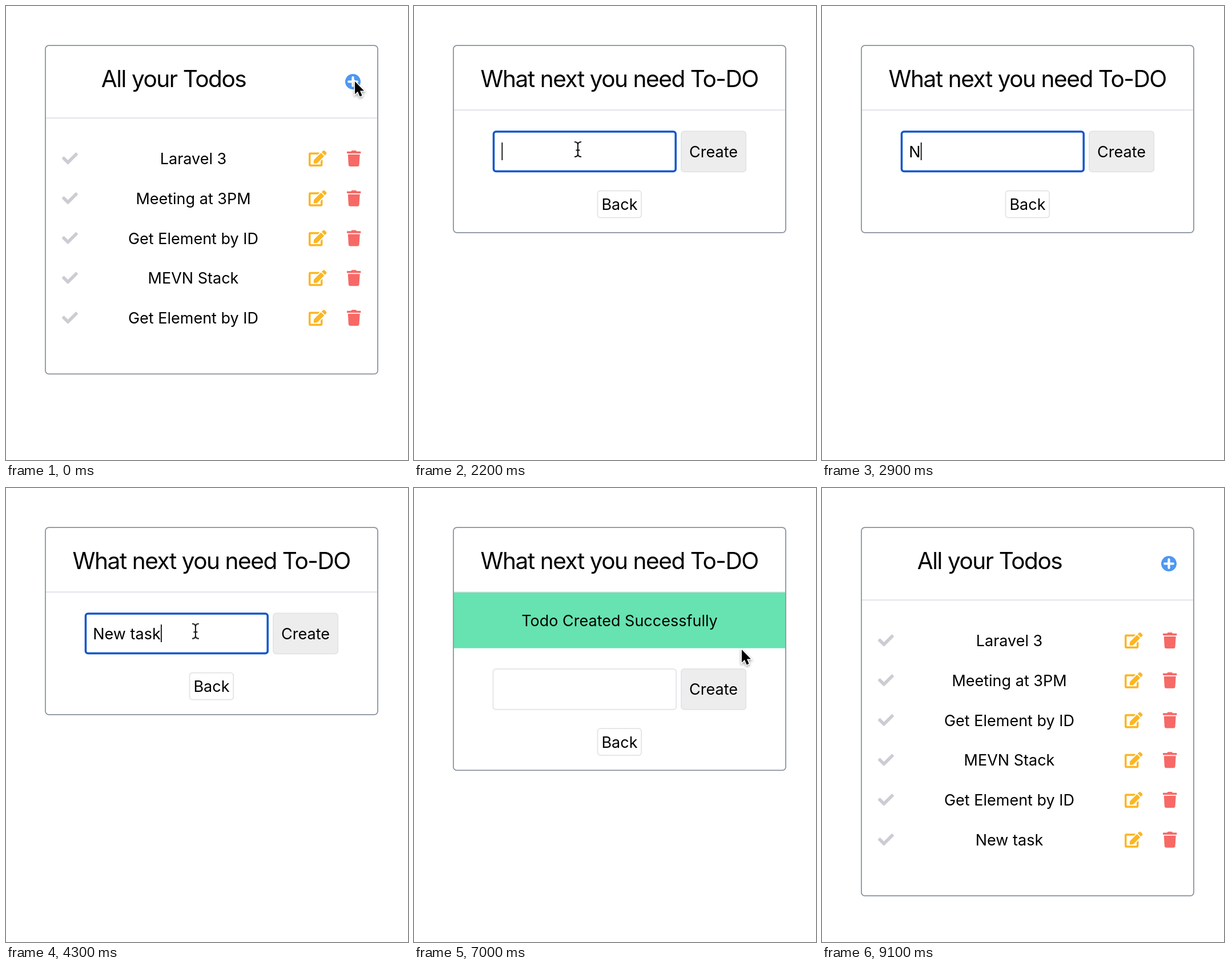
Animation, 704 px wide and 795 px high, one loop 9200 ms. Source, as an HTML page:

```html
<!DOCTYPE html>
<html lang="en">
<head>
<meta charset="utf-8">
<title>Todo list</title>
<style>
  html, body { margin: 0; width: 100%; height: 100%; overflow: hidden; background: #fff; }
  svg { display: block; width: 704px; height: 795px; }
  text { font: 27px Inter, "Open Sans", sans-serif; font-optical-sizing: none; }
  .mid { text-anchor: middle; }
  .title { font-size: 40.6px; letter-spacing: -.036em; }
  .line { fill: #dadee3; }
  .box { fill: #fff; stroke: #e1e3e6; stroke-width: 1.75px; }
  .focus { fill: none; stroke: #1056cc; stroke-width: 3.5px; }
  #card { fill: #fff; stroke: #87909e; stroke-width: 1.75px; }
  #menu rect { fill: #242529; filter: drop-shadow(0 2px 3px #0006); }
  #menu text { font-size: 22.9px; font-weight: 500; fill: #e9e9eb; }
  #arrow { stroke: #fff; stroke-width: 3px; paint-order: stroke; filter: drop-shadow(0 2px 2px #0006); }
  #beam { fill: none; stroke: #111; stroke-width: 2px; }
</style>
</head>
<body>
<svg viewBox="0 0 704 795">
  <defs>
    <path id="check" fill="#cccdd3" d="M174 439L7.5 273c-10-10-10-26 0-36l36-36c10-10 26-10 36 0L192 313 432 73c10-10 26-10 36 0l36 36c10 10 10 26 0 36L210 439c-10 10-26 10-36 0z"/>
    <path id="edit" fill="#fbb623" d="M403 83l90 90c4 4 4 10 0 14L274 406l-92 10c-13 1-23-9-22-22l10-92L389 83c4-4 10-4 14 0zM565 60l-49-49c-15-15-40-15-55 0l-36 36c-4 4-4 10 0 14l90 90c4 4 10 4 14 0l36-36c15-15 15-40 0-55zM384 346V448H64V128H294c3 0 6-1 8-3l40-40c8-8 3-21-8-21H48C21 64 0 85 0 112v352c0 27 21 48 48 48h352c27 0 48-21 48-48V306c0-11-13-16-21-8l-40 40c-2 2-3 5-3 8z"/>
    <path id="trash" fill="#f66966" d="M432 32H312l-9-19A24 24 0 0 0 281 0H167a24 24 0 0 0-22 13L136 32H16A16 16 0 0 0 0 48v32a16 16 0 0 0 16 16h416a16 16 0 0 0 16-16V48a16 16 0 0 0-16-16zM53 467a48 48 0 0 0 48 45h246a48 48 0 0 0 48-45L416 128H32z"/>
  </defs>

  <rect id="card" x="69" y="69" width="582" height="575.4" rx="6"/>

  <g id="list">
    <text class="mid title" x="293.5" y="142">All your Todos</text>
    <rect class="line" x="70" y="195.4" width="580" height="1.6"/>
    <circle cx="607.5" cy="132.5" r="13.5" fill="#4e98f2"/>
    <path d="M600.2 132.5h14.6M607.5 125.2v14.6" stroke="#fff" stroke-width="4.2" stroke-linecap="round"/>
    <g id="rows"></g>
  </g>

  <g id="form">
    <text class="mid title" x="359.7" y="142">What next you need To-DO</text>
    <rect class="line" x="70" y="181.4" width="580" height="1.6"/>
    <g id="notice">
      <rect x="70" y="183" width="580" height="97.5" fill="#66e3b0"/>
      <text class="mid" x="360" y="242">Todo Created Successfully</text>
    </g>
    <g id="controls">
      <rect class="box" x="138.5" y="219.3" width="320.7" height="71" rx="5"/>
      <rect class="box" x="468" y="219.3" width="113.2" height="71" rx="5" style="fill:#ededed"/>
      <text class="mid" x="524.5" y="264.5">Create</text>
      <rect class="box" x="321.5" y="323.5" width="76.7" height="47" rx="5"/>
      <text class="mid" x="360" y="357">Back</text>
      <rect id="fieldFocus" class="focus" x="139.5" y="220" width="318.7" height="69.5" rx="4"/>
      <rect id="buttonFocus" class="focus" x="469" y="220" width="111.2" height="69.5" rx="4"/>
      <text id="typed" x="152.2" y="264.5"></text>
      <rect id="caret" x="153.5" y="239" width="1.7" height="31"/>
    </g>
    <g id="menu"><rect x="136" y="293" width="397" height="404" rx="6"/></g>
  </g>

  <g id="cursor">
    <path id="arrow" d="M0 0V22.5L5 17.8L8.6 26.4L12.6 24.7L9 16.4H16Z"/>
    <path id="beam" d="M-6-13Q0-13 0-8V8Q0 13-6 13M6-13Q0-13 0-8M0 8Q0 13 6 13M-3.5 1.5H3.5"/>
  </g>
</svg>
<script>
const LOOP = 9200, ROW = 69.76;
const OPEN = 1700, FOCUS = 2200, MENU = 2300, CLICK = 5400, SAVED = 5700, RETURN = 8300;
const $ = id => document.getElementById(id);

function add(parent, tag, attrs, text = '') {
  const el = document.createElementNS('http://www.w3.org/2000/svg', tag);
  for (const key in attrs) el.setAttribute(key, attrs[key]);
  el.textContent = text;
  return parent.appendChild(el);
}

const play = (el, frames) => el.animate(frames, { duration: LOOP, iterations: Infinity });

// Each value holds from its time until the next one.
function hold(el, prop, stops) {
  stops = [...stops, [LOOP, stops.at(-1)[1]]];
  play(el, stops.map(([t, v]) => ({ offset: t / LOOP, [prop]: v, easing: 'step-end' })));
}

function show(el, ...spans) {
  const stops = spans.flatMap(([from, to]) => [[from, 1], [to, 0]]).filter(([t]) => t < LOOP);
  if (stops[0][0] > 0) stops.unshift([0, 0]);
  hold(el, 'opacity', stops);
}

// Travels between points in 100 ms steps.
function travel(el, points) {
  play(el, points.map(([t, x, y], i) => ({
    offset: t / LOOP,
    transform: `translate(${x}px, ${y}px)`,
    easing: i + 1 < points.length ? `steps(${Math.round((points[i + 1][0] - t) / 100)}, end)` : 'linear'
  })));
}

const todos = ['Laravel 3', 'Meeting at 3PM', 'Get Element by ID', 'MEVN Stack', 'Get Element by ID', 'New task'];
const rows = todos.map((todo, i) => {
  const row = add($('rows'), 'g', { transform: `translate(0 ${253 + i * ROW})` });
  add(row, 'text', { class: 'mid', x: 328, y: 24 }, todo);
  [['check', 98], ['edit', 530], ['trash', 597]].forEach(([icon, x]) =>
    add(row, 'use', { href: '#' + icon, transform: `translate(${x} 0) scale(.0545)` }));
  return row;
});

['Get Element by ID', 'Get Element by class', 'Shrieking Shack', 'MEVN Stack',
  'CRUD operations in express JS', 'MERN Stack'].forEach((item, i) =>
  add($('menu'), 'text', { x: 156, y: 347 + i * 62.75 }, item));

const keyTimes = [2800, 3000, 3100, 3300, 3500, 3600, 3800, 4000];
const typed = $('typed');
[...'New task'].forEach((letter, i) => {
  const span = add(typed, 'tspan', {}, letter);
  hold(span, 'fillOpacity', [[0, 0], [keyTimes[i], 1], [SAVED, 0]]);
});
const caretX = i => typed.getEndPositionOfChar(i).x + .3;
hold($('caret'), 'x', [[0, '153.5px'], ...keyTimes.map((t, i) => [t, caretX(i) + 'px'])]);
show($('caret'), [FOCUS, CLICK]);

hold($('card'), 'height', [[0, '575.4px'], [OPEN, '327.8px'], [SAVED, '425.4px'], [RETURN, '645.1px']]);
hold($('controls'), 'transform', [[0, 'translateY(0px)'], [SAVED, 'translateY(97.6px)']]);
show($('list'), [0, OPEN], [RETURN, LOOP]);
show($('form'), [OPEN, RETURN]);
show(rows.at(-1), [RETURN, LOOP]);
show($('fieldFocus'), [FOCUS, CLICK]);
show($('buttonFocus'), [CLICK, SAVED]);
show($('notice'), [SAVED, RETURN]);
show($('menu'), [MENU, keyTimes[0]]);

show($('arrow'), [0, 2000], [4600, 9000]);
show($('beam'), [2000, 2800], [4200, 4600]);
travel($('cursor'), [
  [0, 611, 132], [400, 611, 132], [500, 605, 133.5], [1700, 605, 133.5],
  [2100, 287, 251], [4200, 287, 251], [4800, 556, 249], [5600, 556, 249],
  [5900, 574, 283], [7000, 574, 283], [7400, 500, 543], [7900, 358, 442], [LOOP, 358, 442]
]);
</script>
</body>
</html>
```
